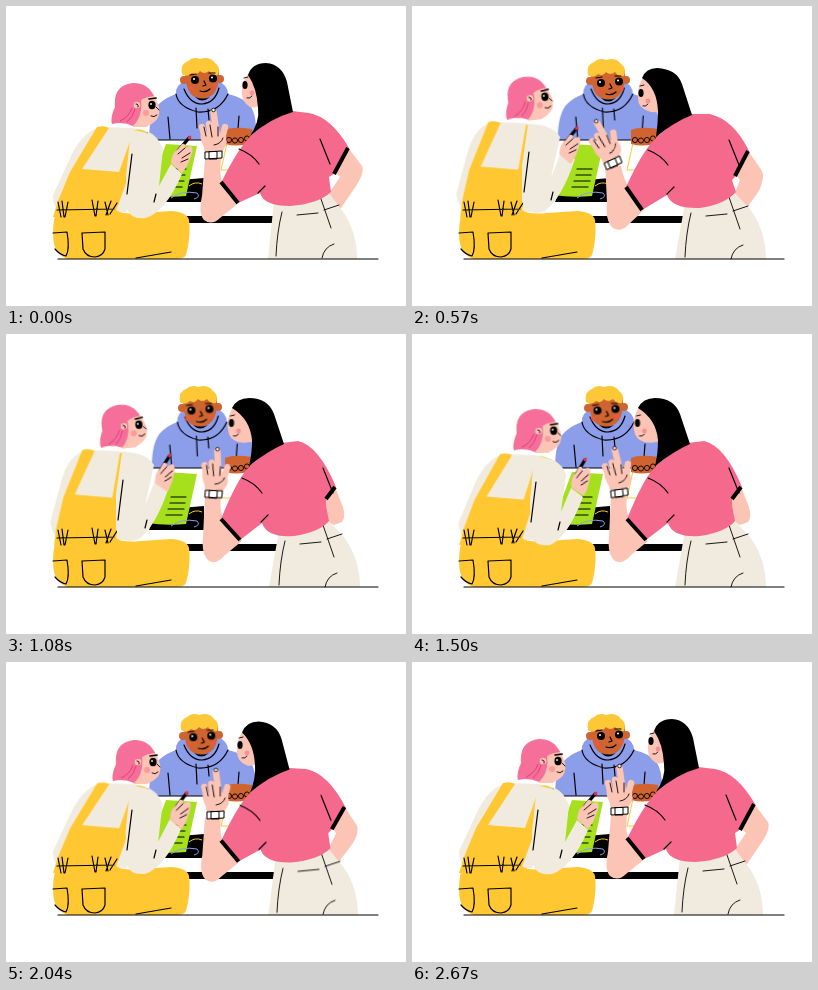
Animation of 400 by 300 pixels, one loop 2.7 s. Source, as an HTML page without scripts:

```html
<!DOCTYPE html>
<html lang="en">
<head>
<meta charset="utf-8">
<title>Three friends at a table</title>
<style>
html, body { margin: 0; width: 100%; height: 100%; overflow: hidden; background: #fff; }
svg { display: block; width: 100vw; height: 100vh; }

.ink { fill: none; stroke: #000; stroke-width: 1.2; stroke-linecap: round; stroke-linejoin: round; }
.thin { stroke-width: .9; }
.cuff { fill: none; stroke: #000; stroke-width: 4; }
.yellow { fill: #ffc832; }
.cream { fill: #f0ebde; }
.skin { fill: #fcc4b4; }
.finger { fill: none; stroke: #fcc4b4; stroke-width: 6.4; stroke-linecap: round; }
.tan { fill: #cf6431; }
.pink { fill: #f56a8c; }
.blue { fill: #8c9de9; }

.move { animation: 2.7s ease-in-out infinite; }

/* woman on the left */
.torso { animation-name: torso; transform-origin: 0 205px; }
@keyframes torso {
  0%, 66.7%, 100% { transform: skewX(0deg) scaleY(1); }
  21.1%, 42% { transform: skewX(9.3deg) scaleY(1.06); }
  55.6% { transform: skewX(2deg) scaleY(1.01); }
  84.4% { transform: skewX(-.5deg) scaleY(.995); }
}
.bob { animation-name: bob; transform-origin: 128px 118px; }
@keyframes bob {
  0%, 66.7%, 100% { transform: translate(0, 0) rotate(0deg); }
  21.1%, 42% { transform: translate(-11px, -6.5px) rotate(-6deg); }
  55.6% { transform: translate(-4px, -2px) rotate(-1deg); }
  84.4% { transform: translate(2px, 2px) rotate(0deg); }
}
.arm { animation-name: arm; }
@keyframes arm {
  0%, 84.4%, 100% { d: path("M125 124Q151 126 157 143L153 180L165 158L176 168Q160 205 140 212Q125 214 121 203L120 170Z"); }
  21.1%, 42% { d: path("M116 118Q140 118 148 131L139 172L149 146L163 153Q150 192 133 205Q115 212 110 195L110 160Z"); }
  55.6% { d: path("M122 122Q148 124 154 140L149 178L159 154L171 163Q156 203 138 211Q123 213 119 202L118 168Z"); }
}
.crease { animation-name: crease; }
@keyframes crease {
  0%, 66.7%, 84.4%, 100% { transform: translate(0, 0); }
  21.1%, 42% { transform: translate(-9px, -2px); }
  55.6% { transform: translate(-2px, 0); }
}
.write { animation-name: write; transform-origin: 176px 150px; }
@keyframes write {
  0%, 100% { transform: translate(0, 0) rotate(0deg); }
  21.1% { transform: translate(-18px, -9px) rotate(-2deg); }
  40% { transform: translate(-17px, -9px) rotate(-8deg); }
  55.6% { transform: translate(-7px, -5px) rotate(-10deg); }
  66.7% { transform: translate(-4px, -1px) rotate(-8deg); }
  84.4% { transform: translate(1px, 1px) rotate(0deg); }
}

/* boy */
.boy { animation-name: boy; }
@keyframes boy {
  0%, 84.4%, 100% { transform: translate(0, 0); }
  21.1% { transform: translate(0, 1px); }
  40%, 66.7% { transform: translate(-2px, 0); }
}
.gaze { animation-name: gaze; }
@keyframes gaze {
  0%, 84.4%, 100% { transform: translate(0, 0) rotate(0deg); }
  21.1% { transform: translate(0, 2px); }
  40%, 66.7% { transform: translate(-1.5px, 2.5px); }
}
.hoodie { animation-name: hoodie; transform-origin: 197px 134px; }
@keyframes hoodie {
  0%, 55.6%, 100% { transform: scaleX(1); }
  21.1%, 40% { transform: scaleX(.95); }
}

/* woman on the right */
.hair { animation-name: hair; }
@keyframes hair {
  0%, 84.4%, 100% { d: path("M242 69Q246 57 260 57Q276 58 281 76L287 106Q265 112 244 130Q254 115 252 102Q251 82 242 69Z"); }
  21.1%, 66.7% { d: path("M230 72Q234 62 245 62Q265 63 270 78L280 109Q262 116 244 131Q246 118 246 105Q245 82 230 72Z"); }
  40%, 55.6% { d: path("M226 74Q231 64 243 64Q262 64 268 80L278 110Q262 117 243 132Q246 120 246 106Q244 85 226 74Z"); }
}
.face { animation-name: face; }
@keyframes face {
  0%, 84.4%, 100% { d: path("M242 68Q235 78 236 88Q236 96 244 101Q250 103 254 98L252 70Z"); }
  21.1%, 66.7% { d: path("M231 71Q225 82 226 92Q226 102 236 105Q243 108 250 104L248 76Z"); }
  40%, 55.6% { d: path("M227 73Q220 85 222 96Q223 105 232 108Q242 110 250 106L246 78Z"); }
}
.look { animation-name: look; }
@keyframes look {
  0%, 84.4%, 100% { transform: translate(0, 0); }
  21.1%, 66.7% { transform: translate(-10px, 8px); }
  40%, 55.6% { transform: translate(-13.5px, 10px); }
}
.shirt { animation-name: shirt; }
@keyframes shirt {
  0%, 84.4%, 100% { d: path("M286 105Q263 111 245 130Q232 142 215 177L232 197L254 187Q258 200 284 200Q312 198 325 186L323 171L329 167L343 142Q325 111 303 107Z"); }
  21.1% { d: path("M279 108Q262 115 245 131Q232 142 214 181L230 204L255 189Q260 203 288 202Q312 199 324 186L320 174L324 170L337 145Q322 114 298 108Z"); }
  40%, 60% { d: path("M276 109Q262 116 244 132Q232 143 215 185L234 206L256 189Q261 204 288 202Q314 198 323 187L320 172L320 165L330 153Q313 112 292 107Z"); }
}
.cuffs { animation-name: cuffs; }
@keyframes cuffs {
  0%, 84.4%, 100% { d: path("M215 176L232 197M342 142L328 168"); }
  21.1% { d: path("M214 181L230 204M336 145L323 170"); }
  40%, 60% { d: path("M215 185L234 206M329 153L320 165"); }
}
.elbow { animation-name: elbow; }
@keyframes elbow {
  0%, 84.4%, 100% { d: path("M343 143L356 160Q359 166 350 180L333 205L322 189L334 171L328 165Z"); }
  21.1% { d: path("M337 146L350 165Q353 171 347 185L334 203L322 189L328 174L323 168Z"); }
  40%, 60% { d: path("M329 153L337 173Q340 183 336 188L328 191L320 187L320 172L319 164Z"); }
}
.forearm { animation-name: forearm; }
@keyframes forearm {
  0%, 84.4%, 100% { d: path("M217 178Q213 170 215 153L199 153L196 190Q192 207 198 214Q206 220 214 212L234 196Z"); }
  21.1% { d: path("M217 182Q212 174 209 160L193 155L195 197Q193 215 201 222Q209 227 217 218L232 204Z"); }
  40%, 60% { d: path("M218 186Q213 177 215 163L199 162L197 203Q195 220 203 227Q211 231 219 221L236 207Z"); }
}
.hand { animation-name: hand; transform-origin: 207px 150px; }
@keyframes hand {
  0%, 100% { transform: translate(0, 0) rotate(0deg); }
  21.1% { transform: translate(-6px, 8px) rotate(-22deg); }
  40% { transform: translate(0, 11px) rotate(5deg); }
  55.6% { transform: translate(0, 10px) rotate(-6deg); }
  66.7% { transform: translate(2px, 8px) rotate(-3deg); }
  84.4% { transform: translate(2px, 0) rotate(4deg); }
}
.trousers { animation-name: trousers; }
@keyframes trousers {
  0%, 84.4%, 100% { d: path("M268 195L262 253L351 253Q351 227 338 207L323 187Z"); }
  21.1%, 62% { d: path("M273 197L263 253L354 253Q354 225 338 203L322 186Z"); }
}
.folds { animation-name: folds; }
@keyframes folds {
  0%, 84.4%, 100% { transform: translate(0, 0); }
  21.1%, 62% { transform: translate(3px, 1px); }
}
</style>
</head>
<body>
<svg viewBox="0 0 400 300">
  <!-- boy -->
  <g class="move hoodie">
    <path class="blue" d="M143 134Q143 106 154 97Q161 91 170 88Q169 79 179 75H212Q222 79 222 88Q237 91 245 101Q251 110 250 134Z"/>
    <path class="ink" d="M170 88Q172 101 192 106Q213 107 222 88M178 83Q184 98 196 98Q209 97 213 82M190 102L191 122M202 103L203 114M162 111L164 133M233 110L232 123"/>
  </g>
  <g class="move boy">
    <circle class="tan" cx="178" cy="74" r="4"/>
    <circle class="tan" cx="214" cy="73" r="4"/>
    <path class="tan" d="M179 64Q179 84 187 90Q196 96 205 90Q214 84 213 63Z"/>
    <path d="M189 91Q196 98 204 91Q197 94 189 91Z"/>
    <path fill="#fdc837" d="M176 68Q174 58 182 55Q187 50 194 53Q204 50 209 57Q215 61 212 69Q206 70 203 65Q198 69 194 65Q191 70 186 67Q181 72 176 68Z"/>
    <g class="move gaze">
      <circle cx="189" cy="74" r="4"/>
      <circle cx="207" cy="72.5" r="4"/>
      <circle cx="188" cy="73" r="1" fill="#fff"/>
      <circle cx="206" cy="71.5" r="1" fill="#fff"/>
      <path class="ink" d="M184 69L190 68M203 67L209 67M198 75L200 79L197 80M194 85Q200 87 204 83"/>
      <g fill="#e9593e"><circle cx="185" cy="82" r="2.5"/><circle cx="209" cy="80" r="2.5"/></g>
    </g>
  </g>

  <!-- table -->
  <path fill="#fff" d="M148 134H252L272 211H140Z"/>
  <path class="ink" d="M146 134H246"/>
  <path d="M180 210H273V217H180Z"/>
  <path d="M151 176L198 172V196H143Z"/>
  <path fill="#a6e01c" d="M160 138L191 140L180 190Q160 192 141 189Z"/>
  <path class="ink" d="M165 163H180M164 169H179M162 175H178M160 181H176"/>
  <path fill="none" stroke="#fdc837" d="M183 180Q189 175 196 178M226 138L221 137L215 164H228"/>
  <path fill="none" stroke="#8c9de9" d="M165 192Q175 184 191 187Q195 191 188 193"/>
  <path class="tan" d="M219 124Q228 120 246 123V136Q234 142 219 138Z"/>
  <g class="ink thin">
    <circle cx="223" cy="134" r="2.6"/><circle cx="229" cy="134.5" r="2.6"/>
    <circle cx="235" cy="134" r="2.6"/><circle cx="241" cy="132.5" r="2.6"/>
  </g>

  <!-- woman on the right -->
  <path class="skin move elbow"/>
  <path class="cream move trousers"/>
  <path class="ink thin move folds" d="M276 206Q271 226 270 250M291 209L312 207M314 190L325 222M316 252Q318 241 328 238M318 204L333 199"/>
  <path class="skin move forearm"/>
  <path class="pink move shirt"/>
  <path class="cuff move cuffs"/>
  <path class="ink move folds" d="M233 143Q246 148 253 158M314 133L324 158M252 187L259 180"/>
  <path class="skin move face"/>
  <path class="move hair"/>
  <g class="move look">
    <ellipse cx="239" cy="79" rx="2.6" ry="4"/>
    <path class="ink thin" d="M238 72L242 71M241 92Q244 93 246 90"/>
    <circle cx="246" cy="87" r="2.4" fill="#f88f96"/>
  </g>
  <g class="move hand">
    <path class="skin" d="M199 153L198 141Q193 132 195 126L218 127Q224 136 217 144L215 153Z"/>
    <path class="finger" d="M199 132L196 121M205 130L203 118M211 130L207.500 106M216 133L219 121"/>
    <circle cx="207.500" cy="104" r="1.8" fill="#fff0e8" stroke="#000" stroke-width=".8"/>
    <path class="ink thin" d="M200 130L198 121M206 131L204 119M212 130L212 121M208 139Q215 138 217 132"/>
    <path fill="#fff" stroke="#000" d="M199 146L216 145V152L199 153ZM203 145.500H211V153H203Z"/>
  </g>

  <!-- woman on the left -->
  <g class="move torso">
    <path class="cream" d="M96 121Q78 124 66 148L47 189Q47 201 53 206H120L155 140Q150 124 126 122Z"/>
    <path class="yellow" d="M91 121Q98 119 103 122L76 163L113 166L128 124Q136 122 141 127L128 155L110 205L108 211H47L52 195L64 166Z"/>
    <path class="ink thin" d="M141 127L129 150"/>
  </g>
  <path class="yellow" d="M51 202L110 204Q116 209 135 207L165 205Q181 206 183 214Q185 231 180 249Q178 253 170 253H62Q51 250 48 238Q45 221 51 202Z"/>
  <path class="ink" d="M51 204L108 203M52 196L55 211M56 195L58 211M62 196L59 211M86 194L89 210M92 195L90 210M99 196L102 209M105 195L100 209M111 197L104 208M47 227L61 226Q64 243 60 250Q54 249 49 243M76 227L99 226V243Q97 250 89 251Q80 251 77 243ZM130 252L165 246"/>
  <path class="cream move arm"/>
  <path class="ink move crease" d="M126 148L121 188M150 188L148 196"/>
  <g class="move write">
    <path class="ink" style="stroke-width:3.4" d="M171 146L183 132"/>
    <path stroke="#e5324b" stroke-width="2.600" stroke-linecap="round" d="M183 132L184 131"/>
    <path class="skin" d="M165 157Q166 146 172 143L176 138Q180 137 179 142L185 140Q188 143 185 150Q182 160 176 167Z"/>
    <path class="ink thin" d="M172 148L179 142M176 152L184 147M175 156L182 153"/>
  </g>
  <g class="move bob">
    <path class="skin" d="M126 92L147 88Q151 94 153 101Q155 112 147 117Q142 120 140 121L127 121Z"/>
    <path fill="#f56f9a" d="M106 118Q104 112 109 101Q107 79 127 77Q142 77 148 90Q139 91 135 94Q137 110 127 120Q117 115 106 118Z"/>
    <path fill="none" stroke="#dd3f78" d="M114 115Q123 111 126 102M121 116Q127 111 129 103"/>
    <circle class="skin" cx="131" cy="99" r="3.300"/>
    <path class="ink thin" d="M130 98Q133 98 132 101M145 110Q148 112 151 109M150 101L153 104"/>
    <path class="ink" style="stroke-width:1.700" d="M143 93L150 92"/>
    <ellipse cx="146" cy="99" rx="3.600" ry="4.200"/>
    <circle cx="145" cy="98" r=".9" fill="#fff"/>
    <circle cx="140" cy="107" r="3" fill="#f99a9b"/>
  </g>

  <path class="ink" d="M52 253H372"/>
</svg>
</body>
</html>
```
